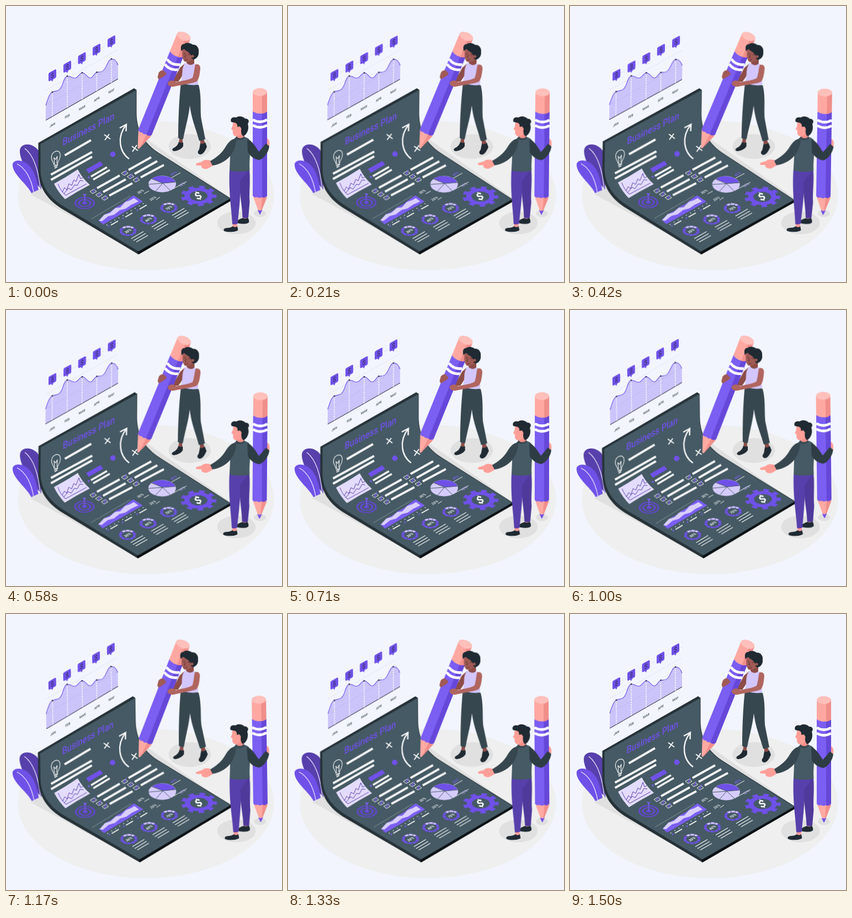
An HTML page that plays this animation: 500 px wide and 500 px high, repeating every 1540 ms.

```html
<!DOCTYPE html>
<html lang="en">
<head>
<meta charset="utf-8">
<title>Business Plan</title>
<style>
  html, body { margin: 0; width: 100%; height: 100%; overflow: hidden; background: #f2f5fe; }
  svg { display: block; width: 100vw; height: 100vh; font-family: Roboto, Arial, sans-serif; }
  .sway { animation: sway 1540ms linear infinite; }
  #chart { transform-origin: 137px 137px; }
  #leaves { transform-origin: 38px 295px; }
  #paper { transform-origin: 234px 300px; }
  #woman { transform-origin: 301px 158px; }
  #man { transform-origin: 411px 279px; }
  @keyframes sway {
    0%, 97.4%, 100% { transform: rotate(0deg); }
    24.35% { transform: rotate(1deg); }
    73.05% { transform: rotate(-1deg); }
  }
  .line { fill: none; stroke: #f5f5f5; }
  .mid { text-anchor: middle; }
</style>
</head>
<body>
<svg viewBox="0 0 500 500">
  <defs>
    <g id="pencil">
      <path d="M-13-36H13L1.5-4Q0-2-1.5-4Z" fill="#ffaaa3"/>
      <path d="M4-33H13L1.5-4Z" fill="#f28f8a"/>
      <path d="M-13-190H13V-35Q8-30 4-33Q-1-30-5-33Q-10-31-13-35Z" fill="#7b5ef2"/>
      <path d="M4-190H13V-35Q8-30 4-33Z" fill="#6648d9"/>
      <path d="M-13-223V-188Q0-180 13-188V-223Z" fill="#ffa8a2"/>
      <path d="M4-223V-184Q10-185 13-188V-223Z" fill="#f08e8a"/>
      <ellipse cy="-223" rx="13" ry="7.2" fill="#ffbfba"/>
      <path d="M-13-173Q0-165.500 13-173M-13-163Q0-155.500 13-163" fill="none" stroke="#fff" stroke-width="4.800"/>
    </g>
    <g id="bubble">
      <path d="M-7-2.5Q-7-4.5-5-5.5L5-11Q7-12 7-9.5V1.5Q7 3.5 5.5 4.5L2 6.3L0 11L-2 8.6L-5 10Q-7 11-7 8.5Z" fill="#6f51e8"/>
      <text class="mid" transform="matrix(.87 -.5 0 1 0 4)" font-size="11.500" fill="#2b2d50">$</text>
    </g>
    <g id="check">
      <path class="line" d="M-6 0L1-4L6 0L-1 4Z"/>
      <path d="M-2-1L0 2L3-6" fill="none" stroke="#7b5ef2" stroke-width="1.3"/>
    </g>
    <g id="tasks">
      <use href="#check"/>
      <use href="#check" x="10.5" y="6"/>
      <use href="#check" x="21" y="12"/>
      <path class="line" stroke-width="3.8" d="M7-6L48-29M18 1L59-22M29 7.5L71-15"/>
    </g>
    <g id="donut" fill="none">
      <g transform="scale(1 .6)" stroke-width="5">
        <circle r="13" stroke="#6f51e8"/>
        <path d="M-9.2-9.2A13 13 0 0 1 9.2-9.2" stroke="#cfc3fb"/>
        <circle r="13" stroke="#455a64" stroke-width="5.500" pathLength="100" stroke-dasharray="1.2 8.8"/>
      </g>
      <path class="line" stroke-width="1.3" d="M6 14L28 1M10 17.5L32 4.5M15 20L36 8"/>
    </g>
    <g id="legend">
      <circle r="1.4" fill="#7b5ef2"/>
      <path class="line" stroke-width="2" d="M4-2L17-9.5"/>
    </g>
  </defs>

  <g id="floor">
    <ellipse cx="253.5" cy="343" rx="232" ry="135.5" fill="#efefef"/>
    <g fill="#e0e0e0">
      <path d="M44 341L238 229L408 349L240 447Z"/>
      <ellipse cx="333" cy="254.500" rx="38.5" ry="22.5"/>
      <ellipse cx="417.5" cy="393" rx="35" ry="20.5"/>
      <ellipse cx="460" cy="376" rx="11" ry="6.5"/>
    </g>
  </g>

  <g id="chart" class="sway">
    <path d="M72 180L203 105M72 153L203 79M78 130L203 59" fill="none" stroke="#d9dae6" stroke-dasharray="3 2"/>
    <path d="M72 207V180C76 168 79 157 85 155.500C93 153 97 155 102 143C105 134 107 127 112 127C118 127 121 133 127 130C132 127 134 121 138.500 121C145 121 147 132 154 130C159 128 160 121 165 120C171 119 175 121 180 112C185 102 187 96 192 96C197 96 201 101 203 107V132Z" fill="#7b5ef2" fill-opacity=".32"/>
    <path d="M72 180C76 168 79 157 85 155.500C93 153 97 155 102 143C105 134 107 127 112 127C118 127 121 133 127 130C132 127 134 121 138.500 121C145 121 147 132 154 130C159 128 160 121 165 120C171 119 175 121 180 112C185 102 187 96 192 96C197 96 201 101 203 107" fill="none" stroke="#6f51e8" stroke-width="1.1"/>
    <path d="M72 207L203 132" stroke="#3f3d56" stroke-width="1.1"/>
    <path d="M84 156V200M111 127V185M138 121V169M164.500 120V154M191 96V139" stroke="#fff" stroke-width="1.3" stroke-dasharray="3 1.5"/>
    <path d="M84 156h0M111 127h0M138 121h0M164.500 120h0M191 96h0" stroke="#37355c" stroke-width="3" stroke-linecap="round"/>
    <use href="#bubble" x="84" y="126"/>
    <use href="#bubble" x="111" y="110.500"/>
    <use href="#bubble" x="137.500" y="95"/>
    <use href="#bubble" x="164" y="79.500"/>
    <use href="#bubble" x="191" y="64.500"/>
    <g class="mid" font-size="6" font-weight="500" fill="#37474f">
      <text transform="matrix(.87 -.5 0 1 84 217.500)">JAN</text>
      <text transform="matrix(.87 -.5 0 1 111 202)">FEB</text>
      <text transform="matrix(.87 -.5 0 1 138 186.500)">MAR</text>
      <text transform="matrix(.87 -.5 0 1 164.500 171)">APR</text>
      <text transform="matrix(.87 -.5 0 1 191 156)">MAY</text>
    </g>
  </g>

  <g id="leaves" class="sway">
    <path d="M64 332C48 315 25 283 25 263C25 250 40 248 50 254C58 258 62 266 64 275Z" fill="#5740ab"/>
    <path d="M34 258C50 270 59 298 62 330" fill="none" stroke="#f0ecff" stroke-width="1.2"/>
    <path d="M46 339C38 322 10 304 12 286C15 277 32 278 42 289C53 301 56 318 59 333Z" fill="#6f51e8"/>
    <path d="M20 286C36 294 46 314 50 337" fill="none" stroke="#f0ecff" stroke-width="1.2"/>
  </g>

  <g id="paper" class="sway">
    <path d="M58.500 248L232 149L236.500 152V195C237 228 252 251 279 267.500L408 349V352.500L240 450L104 369C75 352 58.500 329 58.500 295Z" fill="#263238"/>
    <path d="M238 445L406 348.500L408 349V352.500L240 450Z" fill="#0c1114"/>
    <path d="M62.500 250L235.500 152.500V195C236 228 251 252 278 268L406 349L240 444.500L106 364C78 347 62.500 325 62.500 295Z" fill="#455a64"/>

    <text transform="matrix(.8 -.416 0 1 102.500 253.500)" font-size="18.500" font-weight="500" fill="#6f51e8">Business Plan</text>

    <g class="line" stroke-width="2">
      <path d="M178 233L189 241M187 232L179 243M228 254L239 262M237 252L229 264"/>
      <path d="M223 277C205 264 201 237 217 216M206 221L218 214.500L217.500 227" stroke-width="2.400"/>
    </g>
    <circle cx="193.500" cy="268.500" r="5" fill="#6f51e8"/>

    <g class="line" stroke-width="1.100">
      <path d="M87 288C86 281 81 280 82.500 272C84 265 91 261 96 264C100 268 98 277 95 281C93 284 94 286 93 288Z"/>
      <path d="M88 287L87 275L90 278L93 272L92 286"/>
      <path d="M87 291L94 288M88 294L93 291" stroke-width="1.800"/>
    </g>
    <path class="line" stroke-width="4" d="M106.500 270.500L154 243M81.500 305.500L156 264.500M81.500 315L156 273"/>

    <path d="M87 322Q109 310 130 296Q138 312 152 324Q129 336 107 350Q95 338 87 322Z" fill="#e3dcfd"/>
    <path d="M94 322Q99 335 108 343L146 322M102 337L106 329L110 333L114 322L119 325L123 315L127 318L132 305L135 313L139 311M105 340L113 330L118 333L124 324L129 325L134 316L140 317" fill="none" stroke="#5740ab" stroke-width="1"/>

    <path d="M145 296L171 281.500L176 288L150 303Z" fill="#6f51e8"/>
    <circle cx="150" cy="310.500" r="1.800" fill="#7b5ef2"/>
    <path class="line" stroke-width="3.500" d="M154 309L183 292M158 314.500L188 297"/>
    <use href="#tasks" x="158" y="336"/>
    <use href="#tasks" x="215" y="303"/>

    <g transform="translate(142.500 357) scale(1 .6)" fill="none" stroke="#6347cf" stroke-width="3">
      <circle r="17"/>
      <circle r="10.500" stroke-width="3.500"/>
      <circle r="5" fill="#6347cf" stroke="none"/>
    </g>
    <path d="M142.500 357V341M140 340L142.500 345L145 340" fill="none" stroke="#7b5ef2" stroke-width="1.500"/>

    <path d="M168 389L180 377L190 372L200 364L210 359L221 350L231 343L248 354L176 396Z" fill="#7b5ef2"/>
    <path d="M168 389L178 378L188 375L198 366L207 365L216 355L225 352L232 348L240 354L227 360L217 367L206 370L196 378L185 381L174 390Z" fill="#d9cffc"/>
    <path class="line" stroke-dasharray="1 1.500" stroke-width=".9" d="M155 385.500L226 343.500"/>
    <path class="line" stroke-dasharray="1.500 7" stroke-width="1.500" d="M182 397L252 356"/>
    <use href="#legend" x="186" y="399"/>
    <use href="#legend" x="212" y="384.500"/>
    <use href="#legend" x="238" y="370"/>

    <ellipse cx="283" cy="322.500" rx="25" ry="15" fill="#d6ccfc"/>
    <path d="M284 321L264 313A25 15 0 0 1 307 319Z" fill="#6f51e8"/>
    <path d="M258 323L284 321L307 319M284 321L271 335.500M284 321L298 334.500M284 321L264 313" stroke="#455a64" stroke-width="1"/>
    <path class="line" stroke-width="1" d="M300 311L316 302M303 331L327 318M250 340L259 335M272 351L279 346"/>

    <g class="mid" fill="#f5f5f5" font-weight="500" font-size="6.500">
      <text transform="matrix(.87 -.5 .6 .75 245 338)">30%</text>
      <text transform="matrix(.87 -.5 .6 .75 267.500 350.500)">20%</text>
      <text transform="matrix(.87 -.5 .6 .75 320 325)" fill="#bdb0f5">10%</text>
      <text transform="matrix(.87 -.5 .6 .75 305 305)" fill="#7b5ef2">40%</text>
    </g>

    <g transform="translate(349 344) scale(1 .57)" fill="none" stroke="#6f51e8">
      <circle r="21" stroke-width="9.500"/>
      <circle r="28.500" stroke-width="8" pathLength="90" stroke-dasharray="5 5" stroke-dashoffset="2"/>
    </g>
    <text class="mid" transform="matrix(.87 -.5 .5 .8 351.500 349.500)" font-size="20" font-weight="700" fill="#fff">$</text>

    <use href="#donut" x="221" y="407.500"/>
    <use href="#donut" x="258" y="386.500"/>
    <use href="#donut" x="295" y="365.500"/>
    <g class="mid" fill="#f5f5f5" font-weight="700" font-size="6.500">
      <text transform="matrix(.87 -.5 .6 .75 222.500 409.500)">30%</text>
      <text transform="matrix(.87 -.5 .6 .75 259.500 388.500)">60%</text>
      <text transform="matrix(.87 -.5 .6 .75 296.500 367.500)">70%</text>
    </g>
  </g>

  <g id="woman" class="sway">
    <path d="M324 104L315 112C311 121 305 128 302 137L312 137C319 128 323 120 324 114Z" fill="#8d4c48"/>
    <use href="#pencil" transform="translate(238.500 261.500) rotate(22)"/>
    <path d="M276 124C276 119 282 115 286 117L291 123C287 128 281 130 277 133Q273 129 276 124Z" fill="#a05a55"/>
    <path d="M314 240H320L320 249H313ZM352 243H359L361 251H352Z" fill="#8d4c48"/>
    <path d="M313 246Q317 249 321 247L321 254C318 259 312 262 305 263C299 262 301 258 306 256C310 253 312 250 313 246ZM352 249Q357 251 361 247L364 255C361 262 358 268 352 269C346 268 347 263 350 260Z" fill="#1f2a33"/>
    <path d="M317 138L349 143C355 165 351 190 354 206L361 241Q356 245 350 244C344 222 336 205 333 180C331 200 326 215 321 241Q316 242 312 239C312 200 314 165 317 138Z" fill="#37474f"/>
    <path d="M324 103C330 105 338 103 344 105L347 113C345 122 349 130 348 142C338 145 324 142 316 138C321 126 318 118 321 110Z" fill="#d3c6fc"/>
    <path d="M328 92L341 92V104Q334 110 327 103Z" fill="#8d4c48"/>
    <path d="M320 79C318 90 320 98 324 101C331 102 338 98 342 93V78L322 73Z" fill="#a05a55"/>
    <path d="M322 87L325 86M330 88L333 88M326 88L324 92L326 93M324 96.500Q327 98.500 329 96.500" fill="none" stroke="#4a2628" stroke-width=".9"/>
    <path d="M318 82C315 74 318 68 323 69C326 65 335 67 338 70C345 69 350 76 349 82C350 90 346 95 340 97L336 95C337 91 335 88 333 87C331 82 326 82 323 78C321 78 319 80 318 82Z" fill="#1f2a33"/>
    <circle cx="338" cy="91" r="2.500" fill="#a05a55"/>
    <path d="M343 106C349 104 352 108 352 113C351 122 350 133 345 137C335 141 315 143 304 146C297 147 292 143 293 139C296 134 303 134 308 138C320 135 332 134 338 130C341 122 341 113 343 106Z" fill="#b0655f"/>
  </g>

  <g id="man" class="sway">
    <path d="M472 239Q479 242 477 253L472 257Z" fill="#ff9f98"/>
    <use href="#pencil" x="460" y="379"/>
    <path d="M455.500 369Q460 372 464.500 369L460.500 377.500H459.500Z" fill="#6f51e8"/>
    <path d="M410 393H419V402H411ZM429 382H438V388H429Z" fill="#ff9f98"/>
    <path d="M411 399Q415 402 419 399L420.500 406C416 410 402 410 396 408C392 405 396 402 401 402C405 402 408 401 411 399ZM429 384Q434 387 438 383Q441 388 440 392C436 396 424 395 419 393C417 389 421 387 429 384Z" fill="#1f2a33"/>
    <path d="M418 297H441C443 318 440 340 441.500 355L439 383Q433 386 428.500 383C428 365 424 345 423 325Z" fill="#4f399b"/>
    <path d="M405 296L437 298C434 309 426 311 424 320C426 345 421 375 420 394Q415 397 410 395C409 370 403 340 405 296Z" fill="#5740ab"/>
    <path d="M418 226L432 228V239Q424 245 417 239Z" fill="#f28f8a"/>
    <path d="M411 210C411 217 410 219 408 223Q409 225 411 225C410 233 413 236 418 236L426 233L436 225V210Z" fill="#ff9f98"/>
    <path d="M408 210C405 203 412 200 417 202C422 198 431 201 433 204C439 203 442 209 438 213C441 223 437 232 430 236C427 234 426 231 426 227L424 218L419 219C420 213 416 211 412 211Z" fill="#1f2a33"/>
    <circle cx="422.500" cy="223" r="3.800" fill="#ff9f98"/>
    <path d="M373 281C365 278 359 278 355 282L345 285Q342 288 347 289L354 289C353 293 358 296 364 295C369 293 372 291 375 289Z" fill="#ff9f98"/>
    <path d="M417 237Q424 243 432 237C438 239 441 241 442 245C444 262 440 280 441.500 298C430 301 414 301 405 298C406 280 406 262 408 246Z" fill="#455a64"/>
    <path d="M417 240C406 241 401 250 396 258C390 267 382 274 370 281L374 289C390 287 402 278 409 268C415 258 417 250 417 240Z" fill="#37474f"/>
    <path d="M417 236Q424 243 432 236V240Q424 245 416 241Z" fill="#37474f"/>
    <path d="M437 241C446 244 452 255 458 264C463 259 467 253 471 249L477 254C476 264 468 276 459 279C449 278 442 271 438 265Z" fill="#2e3c44"/>
  </g>
</svg>
</body>
</html>
```
